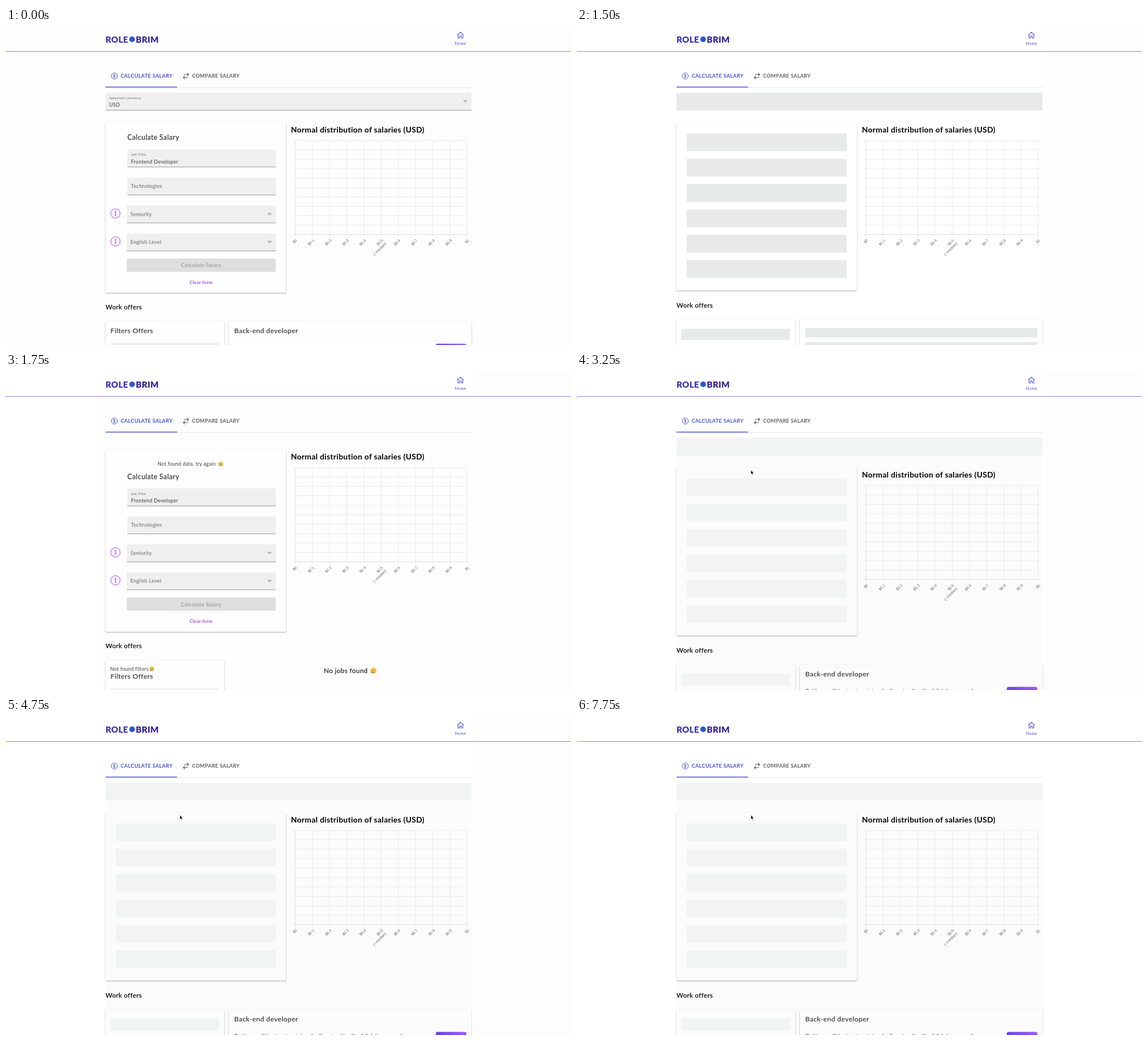
These frames come from a looping animation (999x561 px, 8 s). An HTML page:

```html
<!DOCTYPE html>
<html lang="en">
<head>
<meta charset="utf-8">
<title>Salary calculator</title>
<style>
html, body { margin: 0; width: 100%; height: 100%; overflow: hidden; background: #fdfdfd }
svg { display: block; width: 999px; height: 561px; font-family: Lato, "Open Sans", sans-serif; letter-spacing: .02em }
.card { filter: drop-shadow(0 1.2px .9px rgba(0, 0, 0, .32)) }
.axis { font: 6.7px "Liberation Sans", Arial, sans-serif; letter-spacing: 0 }
</style>
</head>
<body>
<svg id="stage" viewBox="0 0 999 561"></svg>
<script>
const stage = document.getElementById('stage');
const BLUE = '#4652dc', PURPLE = '#9b40f2', INK = '#3a3a3a', GREY = '#666';
const DEFS = '<defs><linearGradient id="violet"><stop stop-color="#6a45e2"/><stop offset="1" stop-color="#9c5cf6"/></linearGradient></defs>';

const rect = (x, y, w, h, fill, r = 0, extra = '') =>
  `<rect x="${x}" y="${y}" width="${w}" height="${h}" rx="${r}" fill="${fill}" ${extra}/>`;
const path = (d, stroke, width = 1, fill = 'none') =>
  `<path d="${d}" stroke="${stroke}" stroke-width="${width}" fill="${fill}"/>`;
const circle = (x, y, r, fill, stroke = 'none') =>
  `<circle cx="${x}" cy="${y}" r="${r}" fill="${fill}" stroke="${stroke}"/>`;
// y is the middle of the capitals
const text = (x, y, size, str, fill = INK, weight = 400, anchor = 'start') =>
  `<text x="${x}" y="${y + size * .36}" font-size="${size}" font-weight="${weight}" fill="${fill}" text-anchor="${anchor}">${str}</text>`;
const shift = (dy, body) => `<g transform="translate(0 ${dy})">${body}</g>`;
const card = (x, y, w, h, fill) => rect(x, y, w, h, fill, 2, 'class="card"');
const arrow = (x, y) => path(`M${x - 3} ${y - 1.5}h6l-3 3.2z`, '#777', .8);

function field(x, y, w, label, value, select) {
  return rect(x, y, w, 31, '#efefef', 2) + rect(x, y + 30.5, w, .9, '#8c8c8c') +
    (value
      ? text(x + 6.5, y + 9, 6.5, label, GREY) + text(x + 6.5, y + 21.3, 8.9, value)
      : text(x + 6.5, y + 15.3, 9, label, GREY)) +
    (select ? arrow(x + w - 11, y + 15.6) : '');
}

function info(y) {
  return circle(193.6, y, 8.2, 'none', PURPLE) + circle(193.6, y - 3.1, 1.1, 'none', PURPLE) +
    path(`M192.2 ${y - .5}h2.2v4.4h-1.6v-3.2`, PURPLE, .8);
}

function sadFace(x, y, r) {
  return circle(x, y, r, '#fbc94a') +
    circle(x - r * .35, y - r * .1, r * .14, '#5b3a10') + circle(x + r * .35, y - r * .1, r * .14, '#5b3a10') +
    path(`M${x - r * .35} ${y + r * .6}q${r * .35} ${-r * .4} ${r * .7} 0`, '#5b3a10', r * .16) +
    circle(x - r * .5, y + r * .5, r * .27, '#4aa9ee');
}

function header() {
  return rect(0, 41, 999, 1, '#8f84e6') +
    text(176, 20.2, 15.2, 'ROLE', '#3b35bd', 900) + circle(223, 20, 5, '#2f55d0') +
    text(229.5, 20.2, 15.2, 'BRIM', '#35209c', 900) +
    path('M798 12.4l5.5-5 5.5 5M799.3 11.5v6.2h2.7v-3.4h3v3.4h2.7v-6.2', BLUE, 1.1) +
    text(803.6, 27.2, 7.1, 'Home', BLUE, 400, 'middle');
}

function tabs() {
  return rect(176, 105, 647, .8, '#e0e0e0') + rect(176, 103.8, 126.5, 1.4, BLUE) +
    circle(191.5, 85, 5.3, 'none', BLUE) + text(191.5, 85, 8, '$', BLUE, 700, 'middle') +
    text(202.7, 85, 9.15, 'CALCULATE SALARY', BLUE, 700) +
    path('M314.5 82.3h8.5M320.2 79.5l2.8 2.8l-2.8 2.8M322 87.8h-8.5M316.3 85l-2.8 2.8l2.8 2.8', '#555', 1.1) +
    text(329, 85, 9.05, 'COMPARE SALARY', '#606060', 700);
}

function chart() {
  const left = 511, top = 199, dx = 30.45, dy = 16.66;
  let out = text(503.7, 179.6, 13.85, 'Normal distribution of salaries (USD)', '#000', 700);
  for (let i = 0; i <= 10; i++) {
    const x = left + i * dx, y = top + i * dy;
    out += rect(x - .4, top, .8, 170.5, i ? '#e7e7e7' : '#d6d6d6') +
      rect(507, y - .4, 308.9, .8, i < 10 ? '#e7e7e7' : '#d6d6d6');
    const label = '$' + (i % 10 ? '0.' + i : i / 10);
    out += `<g class="axis" fill="#666" text-anchor="end" transform="translate(${x + 4} 376.3) rotate(-45)">` +
      `<text>${label}</text>${i === 5 ? '<text y="8">(~median)</text>' : ''}</g>`;
  }
  return out;
}

function form(dy) {
  return shift(dy, text(214.5, 193.8, 12.4, 'Calculate Salary', INK, 600) +
    field(214.5, 215, 262.5, 'Job Title', 'Frontend Developer') +
    field(214.5, 264.5, 262.5, 'Technologies') +
    field(213.5, 314, 263.5, 'Seniority', '', true) + info(328.2) +
    field(213.5, 363.4, 263.5, 'English Level', '', true) + info(377.7) +
    rect(213.5, 408, 263.5, 23.5, '#dedede', 3) +
    text(345, 420, 9.4, 'Calculate Salary', '#a3a3a3', 700, 'middle') +
    text(345, 450, 8, 'Clear form', PURPLE, 700, 'middle'));
}

const heading = y => text(176, y, 11.5, 'Work offers', '#000', 600);

function offer(top) {
  return text(403.5, top + 16.5, 12.2, 'Back-end developer', INK, 600) +
    rect(760, top + 39.8, 54, 22, 'url(#violet)', 3);
}

function formPage(status) {
  return field(176, 114.5, 647, 'Selected currency', 'USD', true) +
    card(176, 168, 319, 300.5, '#fefefe') + form(0) + chart() + heading(494) +
    card(176, 519, 210, 60, '#fefefe') + card(394, 519, 429, 60, '#fefefe') +
    text(184.7, 535.5, 12.2, 'Filters Offers', INK, 600) + rect(184.5, 556.8, 192, 10, '#efefef', 2) +
    offer(519) +
    (status ? rect(0, 553, 340, 8, 'rgba(0,0,0,.025)') + rect(-4, 555.3, 334.5, 12, '#3b3b3b', 2.5) +
      text(-3, 561, 6.6, 'Waiting for rolebrimweb.herokuapp.com...', '#c4c4c4') : '');
}

function emptyPage() {
  return card(176, 137, 319, 321, '#fefefe') + text(268, 160.8, 8.7, 'Not found data, try again') +
    sadFace(380, 161, 4.4) + form(-10.7) + shift(-31.5, chart()) + heading(483.2) +
    card(176, 508.5, 210, 60, '#fefefe') + text(184.5, 523.5, 8.6, 'Not found filters') + sadFace(258, 523.6, 4.4) +
    text(184.7, 536.8, 12.2, 'Filters Offers', INK, 600) + rect(184.5, 558, 192, 10, '#efefef', 2) +
    text(562, 526.5, 11.8, 'No jobs found', '#111', 500) + sadFace(649.5, 526.8, 5.5);
}

function skeletonPage(shade, pointer, loaded) {
  const paper = pointer ? '#fbfbfb' : '#fff';
  let out = rect(171, 42, 655, 519, '#fff') + tabs() +
    (pointer ? rect(176, 146, 647, 415, paper) : '') +
    rect(176, 114.5, 647, 31.5, shade) + card(176, 168, 319, 296.5, paper);
  for (let i = 0; i < 6; i++) out += rect(193.7, 186.5 + i * 44.9, 283.3, 31.3, shade, 1);
  out += chart() + heading(490.5) + card(176, 516, 210, 60, paper) + card(394, 516, 429, 60, paper) +
    rect(184.5, 532.5, 192, 19.7, shade, 1);
  out += loaded
    ? offer(515.7) + text(403.5, 563, 8.9, 'Quidem mollitia et autem totam facilis aut velit odit nihil dolorum eos fuga', INK)
    : rect(403.5, 531, 410.3, 16.7, shade, 1) + rect(403.5, 555.5, 410.3, 16.7, shade, 1);
  if (pointer) out += path('M307.5 171.8v7.6l1.7-1.5l1.2 2.7l1.2-.5l-1.2-2.7h2.3z', '#fff', .6, '#000');
  return out;
}

// The placeholders pulse every 1500 ms
function pulse(t) {
  if (t < 3000) return '#e8eae9';
  if (t < 3250) return '#eeefef';
  return (t - 3250) % 1500 < 750 ? '#f2f3f3' : '#edefee';
}

function scene(t) {
  const page = t < 1500 ? formPage(t >= 750)
    : t >= 1750 && t < 2500 ? emptyPage()
    : skeletonPage(pulse(t), t >= 3000, t >= 3250);
  // The backdrop brightens from the left, at the end across the whole width
  const backdrop = t >= 7500 ? rect(0, 0, 999, 561, '#fff')
    : t >= 1500 ? rect(0, 0, 826, 41, '#fff') + rect(0, 42, 171, 519, '#fff') : '';
  return DEFS + rect(0, 0, 999, 561, '#fdfdfd') + backdrop + header() + tabs() + page;
}

let shown = -1;
function draw() {
  const step = Math.floor(performance.now() % 8000 / 250);
  if (step !== shown) stage.innerHTML = scene((shown = step) * 250);
  requestAnimationFrame(draw);
}
draw();
</script>
</body>
</html>
```
